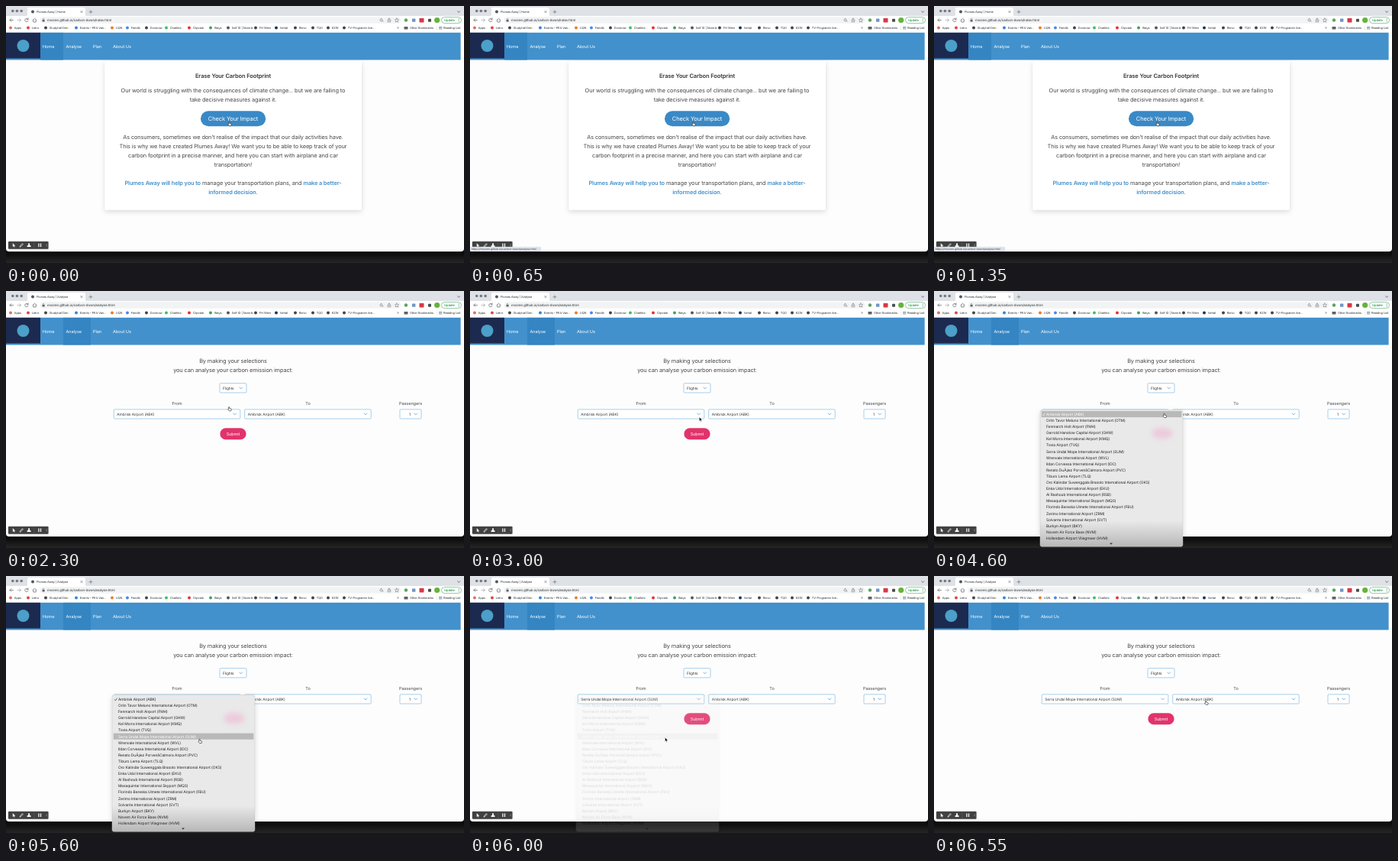
Recreate the animation shown at these times as an HTML page. Size 600 by 336 pixels, loop 6.6 s.

```html
<!DOCTYPE html>
<html lang="en">
<head>
<meta charset="utf-8">
<title>Carbon footprint demo</title>
<style>
html, body { margin: 0; width: 100%; height: 100%; overflow: hidden; background: #18191b; }
svg { display: block; width: 100vw; height: 100vh; }
text { font-family: Inter, "Open Sans", sans-serif; letter-spacing: -.016em; text-rendering: geometricPrecision; white-space: pre; }
.b { font-weight: 600; fill: #4291cc; }
</style>
</head>
<body>
<svg id="stage" viewBox="0 0 600 336" xmlns="http://www.w3.org/2000/svg"></svg>
<script>
const LOOP = 6600, STATUS_ON = 350, NAVIGATE = 1750, OPEN = 4400, CLOSE = 5900, FADE = 120;
const ROW_TOP = 157, ROW = 8.1, PICK = 6;
const BLUE = '#4291cc', INK = '#4a4a4a';
const airports = [
  'Ambrisk Airport (ABK)',
  'Orlin Tavor Meluno International Airport (OTM)',
  'Fenmarch Holt Airport (FMH)',
  'Gerrold Hanstow Capital Airport (GHW)',
  'Kel Morra International Airport (KMQ)',
  'Tovia Airport (TVQ)',
  'Serra Undal Mope International Airport (SUM)',
  'Wrenvale International Airport (WVL)',
  'Ildan Corvessa International Airport (IDC)',
  'Renato DuÃ¡lez PorvenâCalmora Airport (PVC)',
  'Tiburo Lema Airport (TLQ)',
  'Oro Kalindar Suwenggala Brasoto International Airport (OKS)',
  'Enka Udol International Airport (EKU)',
  'Al Rashoub International Airport (RSB)',
  'Mesaquintar International Skyport (MQS)',
  'Florindo Bereska Ulmete International Airport (FBU)',
  'Zerimo International Airport (ZRM)',
  'Solvante International Airport (SVT)',
  'Burkyn Airport (BKY)',
  'Novem Air Force Base (NVM)',
  'Hollendam Airport Vliegmeer (HVM)'
];

// Drawing helpers
const text = (x, y, size, s, fill = INK, more = '') =>
  `<text x="${x}" y="${y}" font-size="${size}" fill="${fill}" ${more}>${s}</text>`;
const mid = (x, y, size, s, fill = INK, more = '') => text(x, y, size, s, fill, 'text-anchor="middle" ' + more);
const rect = (x, y, w, h, fill, r = 0, more = '') =>
  `<rect x="${x}" y="${y}" width="${w}" height="${h}" rx="${r}" fill="${fill}" ${more}/>`;
const dot = (x, y, r, fill) => `<circle cx="${x}" cy="${y}" r="${r}" fill="${fill}"/>`;
const line = (d, color, w = .7, more = '') =>
  `<path d="${d}" fill="none" stroke="${color}" stroke-width="${w}" stroke-linecap="round" stroke-linejoin="round" ${more}/>`;
const group = (id, body) => `<g id="${id}">${body}</g>`;
const fade = (id, y1, y2, from, to) =>
  `<linearGradient id="${id}" gradientUnits="userSpaceOnUse" x1="0" x2="0" y1="${y1}" y2="${y2}"><stop stop-color="${from}"/><stop offset="1" stop-color="${to}"/></linearGradient>`;
const chevron = (x, y) => line(`M${x - 1.8} ${y - 1}l1.8 1.9 1.8-1.9`, BLUE, .7);
const select = (x, y, w, label, dx, id = '') =>
  rect(x, y, w, 12.2, '#fff', 1.2, 'stroke="#6fafda" stroke-width=".6"') +
  text(x + dx, y + 8, 4.85, label, '#363636', id && `id="${id}"`) + chevron(x + w - 7.2, y + 6.2);

function browserBar() {
  const grey = '#5f6368', ink = '#2b2d30';
  const bookmarks = [
    [6, 'Apps', '#e0705a'], [29, 'Letro', '#d9483b'], [52, 'Studyhall Den', '#444'], [92, 'Events – PK’s Van…', '#2f86e0'],
    [139, 'UQN', '#f07a28'], [159, 'Fendle', '#4b86ea'], [184, 'Dockrow', '#444'], [210, 'Chattelo', '#38c45a'],
    [240, 'Clipvale', '#e8302c'], [268, 'Ways', '#3ba35c'], [291, 'Self ID | Nomrik', '#555'], [327, 'FH Wien', '#444'],
    [354, 'Vertal', '#17365c'], [379, 'Rinvo', '#444'], [402, 'TQO', '#444'], [422, 'KZW', '#444'], [443, 'TV-Programm live…', '#444']
  ];
  return rect(0, 0, 600, 13.2, '#dee1e6') + rect(0, 13, 600, 21.6, '#fff') +
    [8.8, 14.4, 20.2].map(x => dot(x, 6.5, 1.8, '#75777a')).join('') +
    '<path d="M26 13.2q2 0 2-2V4q0-2 2-2h72q2 0 2 2v7.2q0 2 2 2Z" fill="#fff"/>' +
    dot(35, 7.6, 2, '#4d565e') + text(40, 9, 3.9, '', ink, 'id="tab"') +
    line('M97.8 6.4l2.4 2.4m0-2.4l-2.4 2.4', grey, .6) + line('M109 7.7h4m-2-2v4', grey, .6) +
    line('M591.5 6.8l1.7 1.6 1.7-1.6', ink, .6) +
    line('M9.5 18.5H5m2-2l-2 2 2 2', grey) + line('M15 18.5h4.5m-2-2l2 2-2 2', '#a4a7ab') +
    line('M28.8 17.3a2.2 2.2 0 1 0 .3 1.8M29 15.8v1.7h-1.7', grey) +
    line('M35 18.5l2.5-2.3 2.5 2.3M35.8 18.2v2.8h3.4v-2.8', grey) +
    rect(44.5, 14.3, 473, 8.4, '#f1f3f4', 4.2) +
    rect(47.6, 18, 3, 2.6, grey, .4) + line('M48.3 18v-.8a.8 .8 0 0 1 1.6 0v.8', grey, .5) +
    text(54, 20.1, 4.35, '', ink, 'id="url"') +
    line('M493 19.3l1 1.2M491.6 16.7a1.6 1.6 0 1 1-.1 0', grey, .6) +
    line('M501 18h-.8v2.8h3.6V18h-.8M502 19.4v-3.4l-1 1m1-1l1 1', grey, .5) +
    line('M512 16l.8 1.7 1.8.2-1.3 1.2.3 1.9-1.6-.9-1.6.9.3-1.9-1.3-1.2 1.8-.2Z', grey, .5) +
    dot(524, 18.5, 2.2, '#57a85b') + rect(532, 16.4, 4.4, 4.4, '#6f97c4', .5) +
    rect(541.5, 16, 6, 5.4, '#d93748', .6) + rect(553, 16.7, 4, 4, '#4a4d51', .8) +
    dot(564.7, 18.5, 3.6, '#62b43a') +
    rect(570.5, 14.6, 26, 8, '#fff', 4, 'stroke="#4ca565" stroke-width=".6"') +
    text(574, 20, 4.1, 'Update', '#1e8e3e', 'font-weight="500"') +
    [16.7, 18.5, 20.3].map(y => dot(593.2, y, .5, '#1e8e3e')).join('') +
    bookmarks.map(([x, s, c]) => dot(x, 28.6, 2, c) + text(x + 4.8, 30, 3.9, s, ink)).join('') +
    text(512, 30.1, 5, '»', grey) + rect(521.5, 27, 5, 3.5, grey, .5) +
    text(529, 30, 3.9, 'Other Bookmarks', ink) + line('M564.5 26v5', '#c8cbd0', .4) +
    line('M567.4 27.2h3.6m-3.6 1.4h3.6m-3.6 1.4h3.6', grey, .6) + text(573, 30, 4, 'Reading List', ink);
}

function navBar() {
  const items = [[48, 'Home'], [78.5, 'Analyse'], [114, 'Plan'], [140, 'About Us']];
  return rect(0, 34.5, 595.6, 36, BLUE) + rect(45, 34.5, 30, 36, '#3485c2', 0, 'id="active"') +
    rect(0, 34.5, 45, 34, '#1d2a50') + dot(22.5, 52, 8, '#4b9fc9') +
    items.map(([x, s]) => text(x, 54.8, 5.6, s, '#fff')).join('');
}

function homePage() {
  const cx = 297.5;
  const lines = [
    [112.6, 'Our world is struggling with the consequences of climate change... but we are failing to'],
    [124.6, 'take decisive measures against it.'],
    [174, 'As consumers, sometimes we don’t realise of the impact that our daily activities have.'],
    [186, 'This is why we have created Plumes Away! We want you to be able to keep track of your'],
    [198, 'carbon footprint in a precise manner, and here you can start with airplane and car'],
    [210, 'transportation!'],
    [233.8, '<tspan class="b">Plumes Away will help you to</tspan> manage your transportation plans, and <tspan class="b">make a better-</tspan>'],
    [245.8, '<tspan class="b">informed decision</tspan>.']
  ];
  return rect(129.5, 72, 336.5, 194.5, '#fff', 2.5, 'filter="url(#shadow)"') +
    mid(cx, 94.4, 7.5, 'Erase Your Carbon Footprint', '#363636', 'font-weight="600"') +
    lines.map(([y, s]) => mid(cx, y, 7.4, s)).join('') +
    rect(255, 137.2, 85.2, 20, '#3a89c7', 10) + mid(cx, 150.2, 7.5, 'Check Your Impact', '#fff');
}

function analysePage() {
  return mid(297.5, 93.6, 7.4, 'By making your selections') +
    mid(297.5, 105.6, 7.4, 'you can analyse your carbon emission impact:') +
    select(280, 120.7, 35, 'Flights', 4) +
    mid(224, 148.5, 5.6, 'From') + mid(395.5, 148.5, 5.6, 'To') + mid(530, 148.5, 5.6, 'Passengers') +
    select(141.3, 154.8, 165.5, airports[0], 4, 'from') +
    select(312.7, 154.8, 165.5, airports[0], 4) +
    select(516, 154.8, 28, '1', 12) +
    rect(280.4, 179.2, 34.2, 15, '#e2336b', 7.5) + mid(297.5, 188.6, 5.5, 'Submit', '#fff');
}

function popup() {
  return rect(139, 155.5, 187, 178.7, 'url(#glass)', 2.6, 'stroke="#bdbdbd" stroke-width=".4" filter="url(#shadow)"') +
    '<ellipse cx="298.8" cy="186" rx="14" ry="7.5" fill="#efb4d2" opacity=".55" filter="url(#soft)"/>' +
    rect(140.8, ROW_TOP, 183.6, ROW, '#b9b9b9', 0, 'id="hover"') +
    line('M142.4 161.6l1 1.3 1.9-3', '#222', .6, 'id="check"') +
    airports.map((s, i) => text(147, (162.9 + i * ROW).toFixed(1), 4.9, s, '#222', 'class="row"')).join('') +
    '<path d="M230 329.4h4l-2 2Z" fill="#333"/>';
}

function recorder() {
  const w = '#f2f2f2';
  return rect(3, 307.8, 52.6, 9.9, '#414141', 1) +
    `<path d="M8.8 310v5l1.2-1 .8 1.6.8-.4-.8-1.5h1.6Z" fill="${w}"/>` +
    line('M18.2 314.8l.5-1.4 2.8-2.8.9.9-2.8 2.8Z', w, .8) +
    `<path d="M29.4 310h1.4l.4 2.6 1.4 1v1.5h-5v-1.5l1.4-1Z" fill="${w}"/>` +
    line('M37 309v7.5', '#666', .4) + rect(42.3, 310.4, 1.3, 4.6, w) + rect(44.9, 310.4, 1.3, 4.6, w) +
    line('M53.6 311.6l-1 1.2 1 1.2', '#ccc', .5);
}

stage.innerHTML = `<defs>
  <filter id="shadow" x="-10%" y="-10%" width="120%" height="125%"><feDropShadow dx="0" dy="2.5" stdDeviation="3" flood-color="#0a0a0a" flood-opacity=".14"/></filter>
  <filter id="soft" x="-60%" y="-90%" width="220%" height="280%"><feGaussianBlur stdDeviation="3"/></filter>
  ${fade('desk', 321, 336, '#060606', '#262626')}${fade('glass', 300, 334, '#e9e9e9', '#b8b8b8')}
  </defs>` +
  rect(0, 0, 600, 336, 'url(#desk)') +
  '<path d="M0 30H600V317q0 4-4 4H4q-4 0-4-4Z" fill="#fdfdfd"/>' +
  group('home', homePage()) + group('analyse', analysePage()) +
  navBar() + browserBar() + recorder() +
  group('link', rect(0, 314.8, 93, 6.2, '#dfe2e8', 1) +
    text(1.8, 319.2, 3.6, 'https://mvoren.github.io/carbon-down/analyse.html', '#4a4d52')) +
  group('menu', popup()) +
  group('pointer',
    '<path id="hand" transform="translate(.7 .7) scale(.88)" d="M-.4 .3Q.3 -.5 .9 .3V2.2l2.2.5Q3.9 3 3.7 3.8L3.2 6H.4L-1.6 3.6Q-1.2 2.8-.4 3.3Z" fill="#fff" stroke="#222" stroke-width=".7"/>' +
    '<path id="arrow" d="M0 0V5.3L1.2 4.2 2 6.1 2.8 5.7 2 3.9H3.7Z" fill="#000" stroke="#fff" stroke-width=".4"/>');

// Setters touch the page only when a value changes
const $ = id => document.getElementById(id);
const set = (el, name, value) => {
  if (el.getAttribute(name) !== String(value)) el.setAttribute(name, value);
};
const write = (id, s) => { if ($(id).textContent !== s) $(id).textContent = s; };
const show = (id, on) => set($(id), 'display', on ? 'inline' : 'none');
const rows = document.querySelectorAll('.row');

// Pointer stops: time, x, y
const stops = [
  [0, 291.3, 150.8], [2500, 291.3, 150.8], [3150, 301.8, 167], [3850, 301.8, 167], [4250, 300.6, 159.5],
  [4750, 300.6, 159.5], [5500, 252.6, 212.6], [5950, 252.6, 212.6], [6450, 355.2, 162.3], [LOOP, 355.2, 162.3]
];

function pointerAt(t) {
  const i = stops.findIndex(s => s[0] > t);
  const [t0, x0, y0] = stops[i - 1], [t1, x1, y1] = stops[i];
  const p = (t - t0) / (t1 - t0), e = p * p * (3 - 2 * p);
  return [x0 + (x1 - x0) * e, y0 + (y1 - y0) * e];
}

function draw(t) {
  const analysing = t >= NAVIGATE, picked = t >= CLOSE;
  const [x, y] = pointerAt(t);
  show('home', !analysing);
  show('analyse', analysing);
  show('link', t >= STATUS_ON && !analysing);
  write('tab', 'Plumes Away | ' + (analysing ? 'Analyse' : 'Home'));
  write('url', `mvoren.github.io/carbon-down/${analysing ? 'analyse' : 'index'}.html`);
  set($('active'), 'x', analysing ? 75 : 45);
  set($('active'), 'width', analysing ? 36 : 30);
  write('from', airports[picked ? PICK : 0]);

  const over = picked ? PICK : Math.max(0, Math.floor((y - ROW_TOP) / ROW));
  show('menu', t >= OPEN && t < CLOSE + FADE);
  set($('menu'), 'opacity', picked ? Math.max(0, 1 - (t - CLOSE) / FADE) : 1);
  set($('hover'), 'y', ROW_TOP + over * ROW);
  set($('check'), 'stroke', over ? '#222' : '#fff');
  rows.forEach((r, i) => set(r, 'fill', i === over ? '#fff' : '#222'));

  const arrow = (t > 2600 && t < 3950) || (t > CLOSE + 50 && y > 167);
  show('hand', !arrow);
  show('arrow', arrow);
  set($('pointer'), 'transform', `translate(${x} ${y})`);
}

const start = performance.now();
function tick() {
  draw((performance.now() - start) % LOOP);
  requestAnimationFrame(tick);
}
tick();
</script>
</body>
</html>
```
